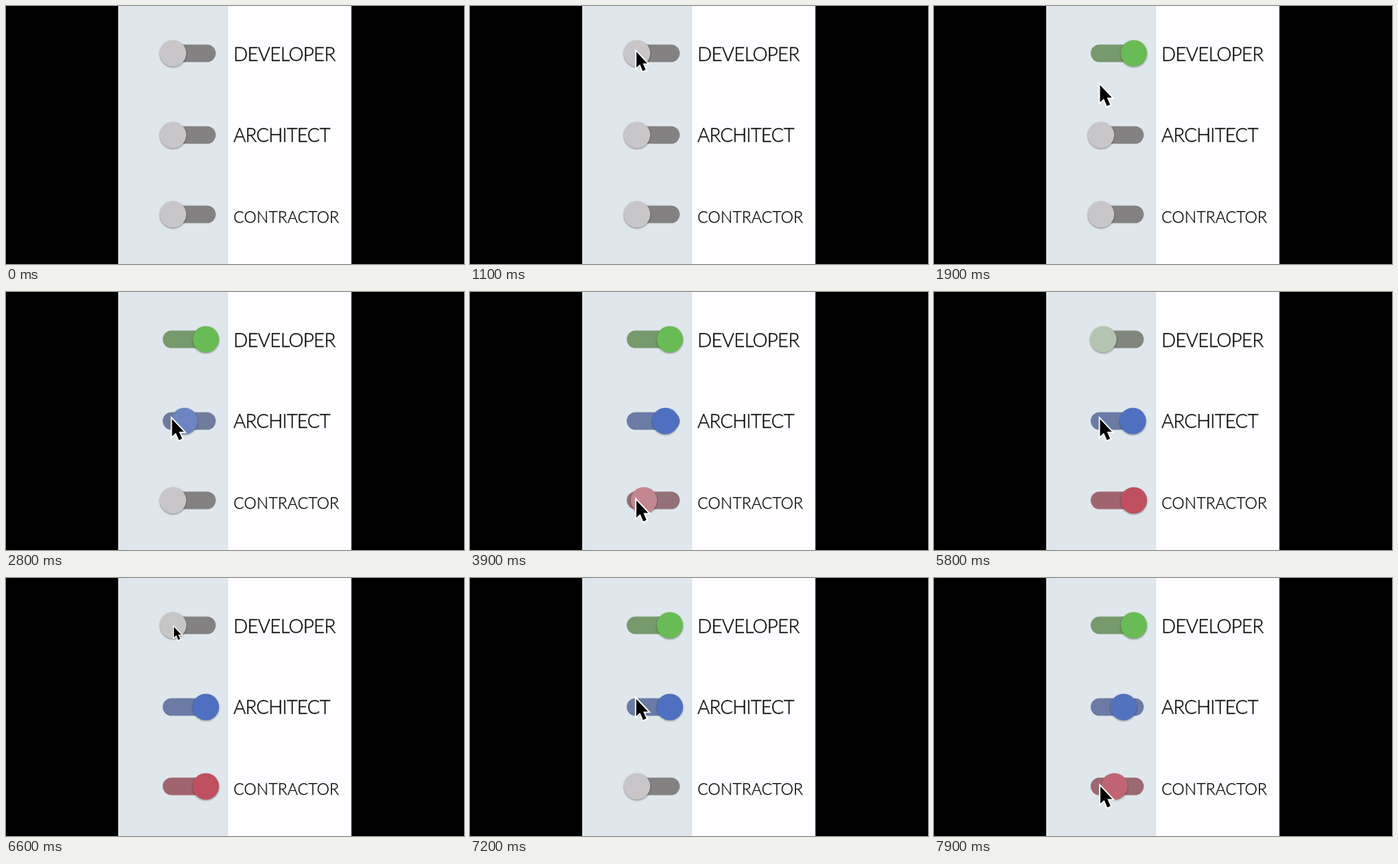
Write an HTML page that moves like this. It is 600x338 px and loops after 8000 ms.

```html
<!DOCTYPE html>
<html lang="en">
<head>
<meta charset="utf-8">
<title>Three switches</title>
<style>
html, body { margin: 0; width: 100%; height: 100%; overflow: hidden; background: #000; }
svg { display: block; width: 100vw; height: 100vh; }
text { font-family: Lato, "Open Sans", sans-serif; font-weight: 300; fill: #000; stroke: #000; stroke-width: .3px; }
.knob { filter: drop-shadow(0 1.5px 1.2px rgba(0, 0, 0, .42)); }
</style>
</head>
<body>
<svg viewBox="0 0 600 338">
  <defs><clipPath id="card"><rect x="147" width="305.5" height="338"/></clipPath></defs>
  <rect width="600" height="338" fill="#000"/>
  <rect x="147" width="144" height="338" fill="#e0e7ec"/>
  <rect x="291" width="161.5" height="338" fill="#fefdff"/>
  <g id="rows"></g>
  <g clip-path="url(#card)">
    <path id="cursor" d="M0 0V22.5L5 18L9 27.5L13.2 25.7L9.2 16.5H15.5Z"
      fill="#000" stroke="#fff" stroke-width="3.4" paint-order="stroke" stroke-linejoin="miter"/>
  </g>
</svg>
<script>
const LOOP = 8000, SLIDE = 400, OFF_LAG = 25;
const GREY = { knob: [200, 198, 201], track: [131, 129, 130] };

// flips: times at which the switch toggles, starting from off
const switches = [
  { label: 'DEVELOPER', y: 62, size: 24.8, gap: -0.6, base: 72, knob: [105, 187, 85], track: [118, 154, 108],
    flips: [1240, 5445, 6585] },
  { label: 'ARCHITECT', y: 169, size: 24.8, gap: -0.7, base: 178, knob: [79, 112, 192], track: [106, 123, 166],
    flips: [2640, 3780, 5445, 7725] },
  { label: 'CONTRACTOR', y: 273, size: 20.6, gap: 0.15, base: 284, knob: [191, 80, 95], track: [160, 100, 111],
    flips: [3780, 6585, 7725] }
];
const presses = [1240, 2640, 3780, 5445, 6585, 7725];

// [start, end, x, y]: the cursor travels to x, y
const home = [456, 100];
const moves = [
  [550, 1050, 217.5, 59],
  [1500, 2400, 217.5, 166.5],
  [2850, 3580, 218, 273],
  [5030, 5330, 217.5, 166.5],
  [5800, 6450, 217.5, 59],
  [6800, 7640, 218, 273]
];

const NS = 'http://www.w3.org/2000/svg';
const rows = document.getElementById('rows');
const cursor = document.getElementById('cursor');

function add(tag, attrs) {
  const el = document.createElementNS(NS, tag);
  for (const k in attrs) el.setAttribute(k, attrs[k]);
  return rows.appendChild(el);
}

for (const s of switches) {
  s.bar = add('rect', { x: 205.3, y: s.y - 11.5, width: 69.5, height: 23, rx: 11.5 });
  s.dot = add('circle', { class: 'knob', cy: s.y, r: 17.3 });
  add('text', { x: 298, y: s.base, 'font-size': s.size, 'letter-spacing': s.gap }).textContent = s.label;
}

const clamp = v => Math.min(1, Math.max(0, v));
const ease = v => (1 - Math.cos(Math.PI * clamp(v))) / 2;
const mix = (a, b, p) => 'rgb(' + a.map((v, i) => Math.round(v + (b[i] - v) * p)) + ')';

function amount(flips, t) {
  return flips.reduce((sum, at, i) => i % 2
    ? sum - ease((t - at - OFF_LAG) / SLIDE)
    : sum + ease((t - at) / SLIDE), 0);
}

function cursorScale(t) {
  let dip = 0;
  for (const at of presses) {
    const d = t - at;
    dip = Math.max(dip, d < 0 ? ease(1 + d / 200) : ease(1 - d / 110));
  }
  return 1 - 0.4 * dip;
}

function draw(t) {
  for (const s of switches) {
    const a = amount(s.flips, t);
    const tint = 1 - Math.pow(1 - clamp(a), 3.3);
    s.dot.setAttribute('cx', 218.8 + 43 * a);
    s.dot.setAttribute('fill', mix(GREY.knob, s.knob, tint));
    s.bar.setAttribute('fill', mix(GREY.track, s.track, tint));
  }
  let [x, y] = home;
  for (const [from, to, nx, ny] of moves) {
    const p = ease((t - from) / (to - from));
    x += (nx - x) * p;
    y += (ny - y) * p;
  }
  cursor.setAttribute('transform',
    `translate(${x + 6.5} ${y + 13}) scale(${cursorScale(t)}) translate(-6.5 -13)`);
}

const start = performance.now();
function tick() {
  draw((performance.now() - start) % LOOP);
  requestAnimationFrame(tick);
}
draw(0);
tick();
</script>
</body>
</html>
```
